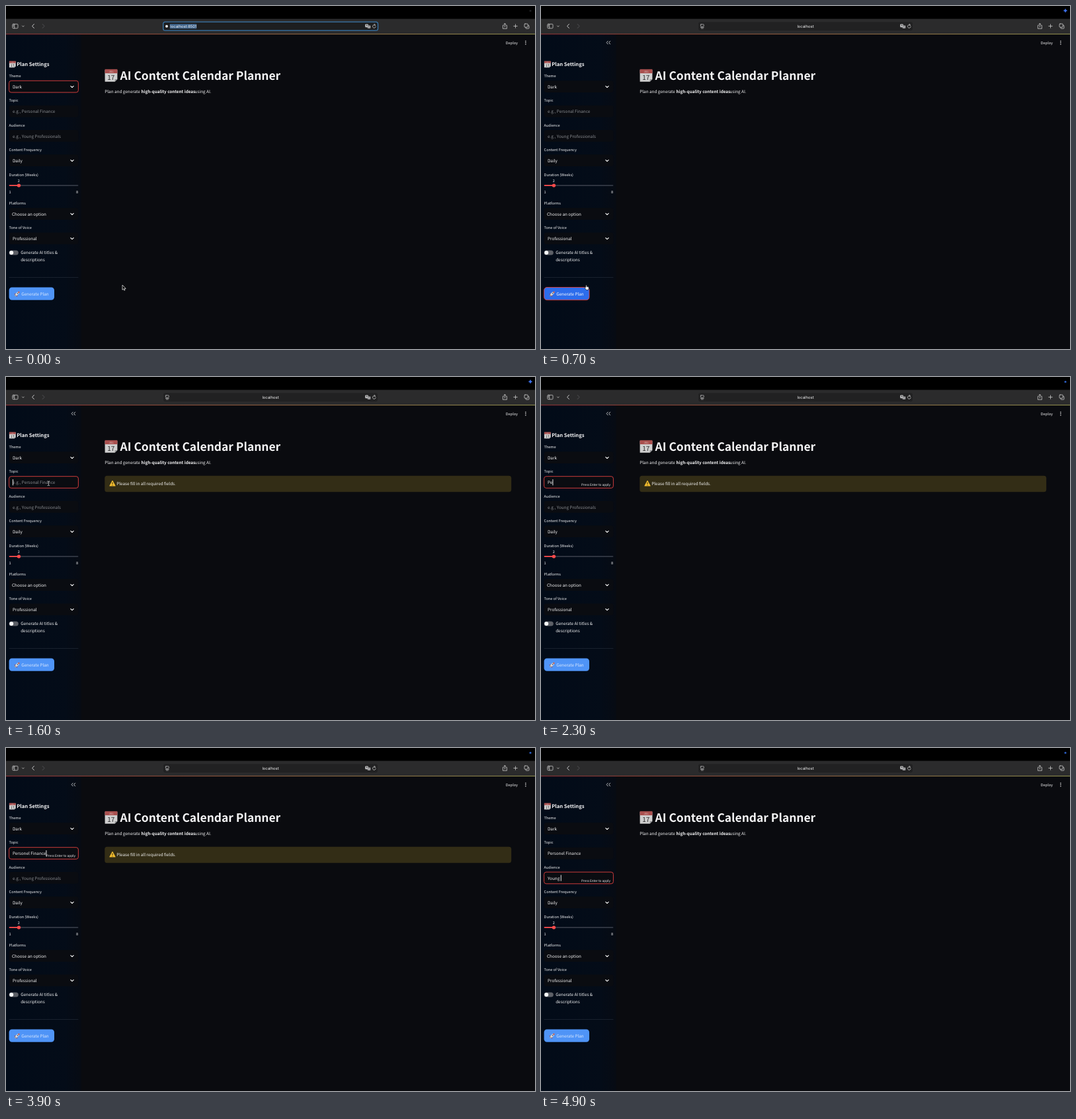
An HTML page that plays this animation: 800x520 px, repeating every 5 s.

```html
<!DOCTYPE html>
<html>
<head>
<meta charset="utf-8">
<title>Content planner</title>
<style>
  html, body { margin: 0; width: 100%; height: 100%; overflow: hidden; background: #000; }
  svg { display: block; width: 800px; height: 520px; }
  text {
    font-family: 'Noto Sans CJK SC', 'Noto Sans CJK JP', 'Noto Sans CJK', 'Noto Sans', sans-serif;
    fill: #f6f6f7; white-space: pre; text-rendering: geometricPrecision;
  }
  text.ui { font-family: Inter, Roboto, sans-serif; }
  .line { fill: none; stroke: #c9c9ca; stroke-width: .8; stroke-linecap: round; stroke-linejoin: round; }
</style>
</head>
<body>
<svg id="stage" viewBox="0 0 800 520" xmlns="http://www.w3.org/2000/svg"></svg>
<script>
const LOOP = 5000, STEP = 100;
const BODY = 6.35, LABEL = 5.55, HINT = 4.76;
const RED = '#e2413f', FIELD = '#0a0c11', GHOST = '#8b8e93';

const text = (x, y, s, size = BODY, attrs = '') =>
  `<text x="${x}" y="${y}" font-size="${size}" ${attrs}>${s}</text>`;
const rect = (x, y, w, h, r, fill, attrs = '') =>
  `<rect x="${x}" y="${y}" width="${w}" height="${h}" rx="${r}" fill="${fill}" ${attrs}/>`;
const line = (d, attrs = '') => `<path class="line" d="${d}" ${attrs}/>`;
const dot = (x, y, r, fill, attrs = '') => `<circle cx="${x}" cy="${y}" r="${r}" fill="${fill}" ${attrs}/>`;
const group = (id, inner) => `<g id="${id}">${inner}</g>`;

const label = (y, s) => text(4.6, y + 2.1, s, LABEL);
const field = (y, id = '') =>
  rect(4.6, y - 9, 104.8, 17.7, 3.3, FIELD, id && `id="${id}" stroke-width=".9"`);
const select = (y, value, x = 10, id = '') =>
  field(y, id) + text(x, y + 2.4, value) +
  line(`M97.8 ${y - 1}l2.2 2.2 2.2-2.2`, 'style="stroke:#f2f2f2;stroke-width:1.1"');
const input = (y, id) =>
  field(y, id + 'Box') + text(10, y + 2.4, '', BODY, `id="${id}Text"`) +
  text(61, y + 5.6, 'Press Enter to apply', HINT, `id="${id}Hint"`) +
  rect(0, y - 4.6, .9, 9.2, 0, '#fff', `id="${id}Caret"`);

const calendar = (x, y, size) => `<g transform="translate(${x} ${y}) scale(${size / 20})">
  <path d="M.6 2H19.4V16L15.6 19.8H.6Z" fill="#cfcfcf"/>
  <path d="M15.6 19.8V16H19.4Z" fill="#8f9092"/>
  <path d="M.6 .8H19.4V7H.6Z" fill="#a9504f"/>
  ${text(10, 5.5, 'JUL', 4, 'text-anchor="middle" style="fill:#e3c9c8"')}
  ${text(9.8, 16.8, '17', 10, 'text-anchor="middle" style="fill:#2b2b2d" font-weight="500"')}</g>`;

const rocket = `<g transform="translate(17 436.3) rotate(45)">
  <path d="M-1.7 1.2L-3.2 3.6-1 3ZM1.7 1.2L3.2 3.6 1 3Z" fill="#b8433d"/>
  <path d="M0-5C2-3 2.2 0 1.3 3H-1.3C-2.2 0-2-3 0-5Z" fill="#d3d8de"/>
  <path d="M0-5C.9-4.2 1.3-3.4 1.5-2.5H-1.5C-1.3-3.4-.9-4.2 0-5Z" fill="#c44a40"/>
  <circle cy="-.8" r=".9" fill="#33507a"/>
  <path d="M-.9 3H.9L0 5.4Z" fill="#f0a63a"/></g>`;

const toolbar = rect(0, 19.5, 800, 23, 0, '#2b2b2c') +
  rect(9.8, 27.4, 8.2, 6.4, 1.2, 'none', 'class="line"') + line('M12.7 27.4v6.4M11 29.2h.6M11 30.6h.6') +
  line('M24.5 30l1.4 1.4 1.4-1.4') +
  line('M42.4 27.5l-2.9 3 2.9 3', 'style="stroke-width:1"') +
  line('M55.2 27.5l2.9 3-2.9 3', 'style="stroke:#505052;stroke-width:1"') +
  line('M752.6 29.3h-1.2v5h6v-5h-1.2M754.4 32v-5.6M752.8 27.9l1.6-1.6 1.6 1.6') +
  line('M767.8 30.5h5.4M770.5 27.8v5.4') +
  rect(784, 27, 5.2, 5.2, 1, 'none', 'class="line"') +
  line('M786 32.4v1c0 .5.3.8.8.8h3.4c.5 0 .8-.3.8-.8v-3.4c0-.5-.3-.8-.8-.8h-.8') +
  group('urlIdle', rect(238, 24.2, 324, 13, 3.2, '#212122') +
    rect(241.4, 27.8, 4.8, 3.4, .6, 'none', 'class="line" style="stroke-width:.7"') +
    line('M241.4 32.6h4.8M242.4 34h2.8', 'style="stroke-width:.7"') +
    text(400, 32.8, 'localhost', 5.9, 'class="ui" text-anchor="middle"')) +
  group('urlFocus', rect(237.7, 24.2, 324.8, 13, 3.2, '#1d1e20', 'stroke="#3a78ad" stroke-width="1.3"') +
    rect(247.8, 27.2, 40.4, 7.2, 0, '#3f648c') + dot(243, 30.7, 2, '#ececec') +
    text(248.3, 32.8, 'localhost:8501', 5.9, 'class="ui"')) +
  rect(543.2, 27.6, 4.6, 4.6, 1, '#cfcfd0') + rect(546.6, 29.6, 4.8, 4.4, 1, '#9b9b9d') +
  line('M544.4 29.2h2.2M545.5 28.6v.6M544.6 31l1.7-1.6', 'style="stroke:#2b2b2c;stroke-width:.5"') +
  line('M558.9 29.7a2.4 2.4 0 1 0 .3 1.6M557 27.2l1.3 1.2-1.3 1.1');

const sidebar = rect(0, 42.5, 113.7, 478, 0, 'url(#side)') +
  line('M101.2 53.2l-2 2.3 2 2.3M104.6 53.2l-2 2.3 2 2.3', 'id="fold" style="stroke:#e9e9ea"') +
  calendar(4.6, 83, 10.4) + text(16.2, 91, 'Plan Settings', 7.6, 'font-weight="600"') +
  label(105.8, 'Theme') + select(122.3, 'Dark', 10, 'themeBox') +
  label(143.2, 'Topic') + input(159.7, 'topic') +
  label(180.7, 'Audience') + input(197.1, 'audience') +
  label(218, 'Content Frequency') + select(234.3, 'Daily') +
  label(255.4, 'Duration (Weeks)') +
  text(19.2, 267.2, '2', LABEL, 'text-anchor="middle"') +
  rect(4.6, 271.2, 104.8, 1.7, .8, '#343a45') + rect(4.6, 271.2, 15, 1.7, .8, '#ff4b4b') +
  dot(19.4, 272.1, 2.7, '#ff4b4b') +
  text(4.6, 284.4, '1', LABEL) + text(109.2, 284.4, '8', LABEL, 'text-anchor="end"') +
  label(299, 'Platforms') + select(315.3, 'Choose an option', 9) +
  label(336.3, 'Tone of Voice') + select(352.5, 'Professional') +
  rect(4.6, 370.4, 14.2, 7.2, 3.6, '#5c5f66') + dot(8.2, 374, 3, '#fafafa') +
  text(22.2, 376.3, 'Generate AI titles &amp;') + text(22.2, 386.9, 'descriptions') +
  rect(4.6, 411.1, 104.8, .6, 0, '#27303d') +
  rect(4.6, 426.5, 68.4, 19.2, 4.4, '#4f94f7', 'id="button" stroke-width=".9"') +
  rocket + text(23.2, 438.7, 'Generate Plan', BODY, 'id="buttonText"');

const page = text(755.8, 57.6, 'Deploy', LABEL) +
  [53.2, 55.6, 58].map(y => dot(785.9, y, .75, '#f2f2f2')).join('') +
  calendar(149, 95, 20) +
  text(172.6, 112, 'AI Content Calendar Planner', 17.4, 'font-weight="700"') +
  text(149.3, 132, 'Plan and generate <tspan x="204.4" font-weight="600">high-quality content ideas</tspan>' +
    '<tspan x="285.6">using AI.</tspan>') +
  group('warning', rect(149.3, 149.8, 614.9, 24.4, 3.5, '#332d16') +
    '<path d="M161 157.6L165 165H157Z" fill="#f2bd2f" stroke="#f2bd2f" stroke-width="1.2" stroke-linejoin="round"/>' +
    rect(160.5, 159.4, 1, 3.2, .4, '#2a2412') + dot(161, 164, .6, '#2a2412') +
    text(167.2, 164.2, 'Please fill in all required fields.'));

const pointers = group('arrow',
    '<path d="M0 0V7.3L1.7 5.8 2.8 8.2 4 7.6 2.9 5.4H5.2Z" fill="#000" stroke="#fff" stroke-width=".7"/>') +
  group('hand', '<path d="M-1.2-3.4c.9-.4 1.3 0 1.3.8V-1c1.5-.1 3 .2 3 1.6 0 1.8-.6 3.4-2.4 3.4S-2 2.4-2.9.5c-.4-.9.6-1.2 1.3-.4Z"' +
    ' fill="#fff" stroke="#111" stroke-width=".7"/>') +
  group('beam', line('M-1.4-3.4Q0-3.4 0-2.4 0-3.4 1.4-3.4M0-2.4V2.4M-1.4 3.4Q0 3.4 0 2.4 0 3.4 1.4 3.4'));

stage.innerHTML = `<defs>
  <linearGradient id="side"><stop offset="0" stop-color="#020b18"/><stop offset=".8" stop-color="#040c18"/>
    <stop offset="1" stop-color="#070b13"/></linearGradient>
  <linearGradient id="strip"><stop offset="0" stop-color="#ff4b4b"/><stop offset="1" stop-color="#fffd80"/></linearGradient>
  </defs>` + rect(0, 0, 800, 520, 0, '#000') + rect(0, 42.5, 800, 478, 0, '#0a0b0f') +
  sidebar + page + toolbar + rect(0, 42.2, 800, .9, 0, 'url(#strip)', 'opacity=".62"') +
  '<path id="spark" d="M793 4.4Q793.5 6.5 795.6 7 793.5 7.5 793 9.6 792.5 7.5 790.4 7 792.5 6.5 793 4.4Z" fill="#3f74f2" stroke="#3f74f2" stroke-width=".7"/>' +
  dot(793, 7.2, 1.5, '#2c5fc4', 'id="lamp"') + group('mouse', pointers);

const el = {};
document.querySelectorAll('[id]').forEach(e => el[e.id] = e);
const show = (id, on) => el[id].style.display = on ? '' : 'none';

// [time, x, y]
const route = [[0, 176, 423], [450, 68.5, 436], [650, 68.5, 436], [1100, 88, 162.6], [1300, 88, 162.6], [1700, 60, 161]];
function mouseAt(t) {
  const i = route.findIndex(p => p[0] > t);
  if (i < 0) return route[route.length - 1].slice(1);
  const [t0, x0, y0] = route[i - 1], [t1, x1, y1] = route[i];
  const u = (t - t0) / (t1 - t0), k = u * u * (3 - 2 * u);
  return [x0 + (x1 - x0) * k, y0 + (y1 - y0) * k];
}

// [time, typed characters]
const typing = {
  topic: { value: 'Personel Finance', hint: 'e.g., Personal Finance', from: 1400, to: 4100,
    keys: [[2300, 2], [2400, 3], [2500, 4], [2700, 5], [3000, 6], [3200, 8], [3300, 9], [3400, 10],
      [3500, 11], [3600, 12], [3700, 14], [3900, 16]] },
  audience: { value: 'Young ', hint: 'e.g., Young Professionals', from: 4100, to: LOOP,
    keys: [[4600, 1], [4700, 3], [4800, 5], [4900, 6]] }
};
function drawInput(id, t) {
  const { value, hint, from, to, keys } = typing[id];
  const count = keys.reduce((n, k) => t >= k[0] ? k[1] : n, 0);
  const focus = t >= from && t < to, label = el[id + 'Text'];
  label.textContent = count ? value.slice(0, count) : hint;
  label.style.fill = count ? '' : GHOST;
  el[id + 'Box'].setAttribute('stroke', focus ? RED : 'none');
  show(id + 'Hint', focus && count);
  show(id + 'Caret', focus);
  el[id + 'Caret'].setAttribute('x', 10.1 + (count ? label.getComputedTextLength() : 0));
}

function draw(time) {
  const t = Math.floor(time % LOOP / STEP) * STEP;
  const [x, y] = mouseAt(t);
  const hover = x < 73 && y > 426 && y < 446;
  const beam = x < 109 && y > 151 && y < 168.5;

  show('mouse', t < 2100);
  el.mouse.setAttribute('transform', `translate(${x} ${y})`);
  show('hand', hover);
  show('beam', beam);
  show('arrow', !hover && !beam);

  el.button.setAttribute('fill', hover ? '#2d6dec' : '#4f94f7');
  el.button.setAttribute('stroke', hover ? RED : 'none');
  el.buttonText.style.fill = hover ? '#fff' : '#dce9fd';

  show('fold', x < 114);
  show('urlFocus', t < 600);
  show('urlIdle', t >= 600);
  el.themeBox.setAttribute('stroke', t < 600 ? RED : 'none');
  show('warning', t >= 800 && t < 4100);

  show('spark', t >= 100 && t < 1700);
  show('lamp', t < 100 || t >= 1700);
  el.lamp.setAttribute('fill', t < 100 ? '#1f2023' : '#2c5fc4');

  drawInput('topic', t);
  drawInput('audience', t);
}

const start = performance.now();
function tick() {
  draw(performance.now() - start);
  requestAnimationFrame(tick);
}
tick();
</script>
</body>
</html>
```
